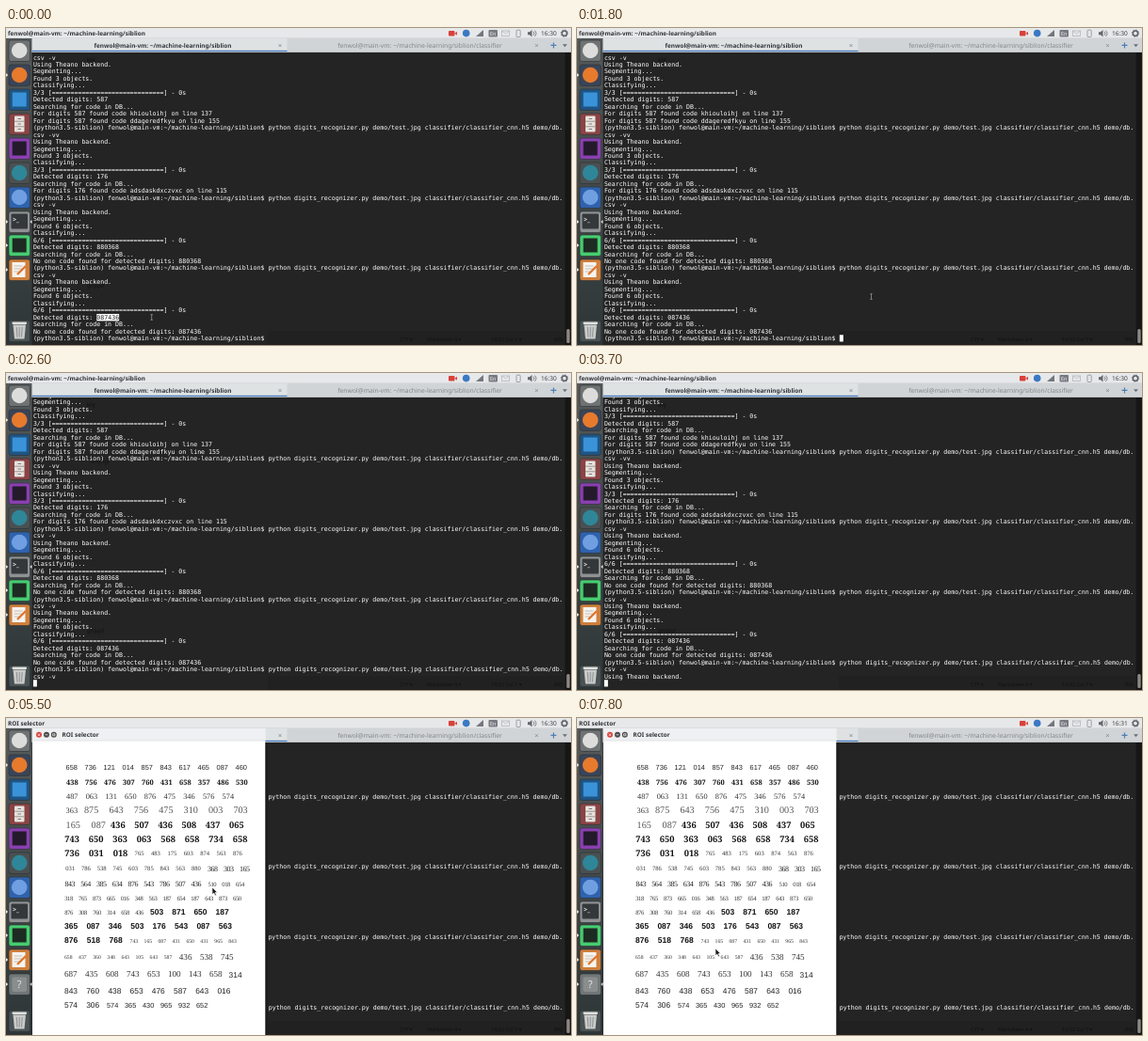
Animation, 600 px wide and 337 px high, one loop 8 s. Source, as an HTML page:

```html
<!DOCTYPE html>
<html lang="en">
<head>
<meta charset="utf-8">
<title>Digits recognizer demo</title>
<style>
  html, body { margin: 0; width: 100%; height: 100%; overflow: hidden; background: #242424; }
  svg { display: block; width: 600px; height: 337px; }
  text { white-space: pre; text-rendering: geometricPrecision; }
  .mono { font: 6.59px "DejaVu Sans Mono", monospace; fill: #fff; }
  .ui { font-family: "Noto Sans", sans-serif; }
</style>
</head>
<body>
<svg id="stage" viewBox="0 0 600 337" width="600" height="337">
  <defs>
    <clipPath id="termClip"><rect x="27" y="26" width="573" height="311"/></clipPath>
    <linearGradient id="dock" x2="0" y2="1">
      <stop offset="0" stop-color="#565a5b"/><stop offset="1" stop-color="#2d3536"/>
    </linearGradient>
    <linearGradient id="shade">
      <stop offset="0" stop-opacity=".45"/><stop offset="1" stop-opacity="0"/>
    </linearGradient>
  </defs>
</svg>
<script>
const LOOP = 8000, STEP = 100;
const CW = 3.967, LH = 7.466, X0 = 28.9, Y0 = 33.5;
const USER = "fenwol@main-vm:", DIR = "~/machine-learning/siblion";
const PROMPT = `(python3.5-siblion) ${USER}${DIR}$ `;
const CMD = "python digits_recognizer.py demo/test.jpg classifier/classifier_cnn.h5 demo/db.";
const SANS = "'Liberation Sans', sans-serif";
const SERIF = "'Liberation Serif', serif";
const WIDE = "'Noto Serif', serif";

const stage = document.getElementById("stage");

function add(parent, tag, attrs, content) {
  const el = document.createElementNS("http://www.w3.org/2000/svg", tag);
  for (const k in attrs) el.setAttribute(k, attrs[k]);
  if (content !== undefined) el.textContent = content;
  parent.appendChild(el);
  return el;
}
const group = (parent, attrs = {}) => add(parent, "g", attrs);
const rect = (p, x, y, width, height, fill, more) => add(p, "rect", { x, y, width, height, fill, ...more });
const circle = (p, cx, cy, r, fill, more) => add(p, "circle", { cx, cy, r, fill, ...more });
const path = (p, d, fill, more) => add(p, "path", { d, fill, ...more });
const label = (p, x, y, size, fill, str, more) =>
  add(p, "text", { x, y, "font-size": size, fill, class: "ui", ...more }, str);
const show = (el, on) => el.setAttribute("visibility", on ? "visible" : "hidden");
const lineY = i => Y0 + i * LH;

// Terminal
function run(objects, digits, found) {
  return ["Using Theano backend.", "Segmenting...", `Found ${objects} objects.`, "Classifying...",
    `${objects}/${objects} [${"=".repeat(30)}] - 0s`, `Detected digits: ${digits}`,
    "Searching for code in DB...",
    ...(found.length ? found.map(([code, n]) => `For digits ${digits} found code ${code} on line ${n}`)
      : [`No one code found for detected digits: ${digits}`])];
}
const log = [
  "csv -v", ...run(3, "587", [["khiouloihj", 137], ["ddageredfkyu", 155]]),
  PROMPT + CMD, "csv -vv", ...run(3, "176", [["adsdaskdxczvxc", 115]]),
  PROMPT + CMD, "csv -v", ...run(6, "880368", []),
  PROMPT + CMD, "csv -v", ...run(6, "087436", []),
  PROMPT
];

rect(stage, 27, 26, 573, 311, "#242424");
rect(stage, 278, 322, 315, 15, "#212121");
const ghosts = group(stage);
[[418, "CTY \u25be"], [447, "Markdown 4 \u25be"], [515, "10:32 Col 7 \u25be"], [582, "INS"]]
  .forEach(([x, s]) => label(ghosts, x, 333, 5.5, "#121212", s));
[[86, 36, "khj"], [90, 96, "dfkjhgf"], [86, 276, "ghjsjsf"]]
  .forEach(([x, y, s]) => label(ghosts, x, y, 6, "#121212", s));

const term = group(stage, { "clip-path": "url(#termClip)" });
const page = group(term);
const addLine = (i, s, x = X0) => add(page, "text", { x, y: lineY(i), class: "mono" }, s);
log.forEach((s, i) => addLine(i, s));
const typed = [addLine(40, CMD, X0 + PROMPT.length * CW), addLine(41, "csv -v")];
const backend = addLine(42, "Using Theano backend.");
const picked = group(page);
rect(picked, X0 + 17 * CW, lineY(37) - 5.8, 6 * CW, LH, "#fff");
add(picked, "text", { x: X0 + 17 * CW, y: lineY(37), class: "mono", style: "fill:#242424" }, "087436");
const caret = rect(page, 0, 0, CW, 7.2, "#fff");

rect(stage, 593.5, 26, 6.5, 311, "#161616");
rect(stage, 595.3, 320, 3.4, 15, "#8d8a86", { rx: 1.5 });

// Tabs
rect(stage, 27, 11, 573, 15, "#d1d4d6");
rect(stage, 27, 11, 271.5, 14.5, "#dfe2e3");
rect(stage, 28, 23.8, 270.5, 1.5, "#4a7fc0");
rect(stage, 27, 25.2, 573, .8, "#b9bdc2");
label(stage, 166.5, 21, 6.4, "#33373c", `${USER} ${DIR}`, { "text-anchor": "middle", "font-weight": 700 });
label(stage, 439.5, 21, 6.76, "#82868b", `${USER} ${DIR}/classifier`, { "text-anchor": "middle" });
[291, 563.5].forEach(x => path(stage, `M${x - 1.4} 17.2l2.8 2.8m0-2.8l-2.8 2.8`, "none",
  { stroke: "#82868b", "stroke-width": .8 }));
path(stage, "M578.5 18.4h6M581.5 15.4v6", "none", { stroke: "#4d7fb5", "stroke-width": 1.2 });
path(stage, "M591 17.2h5l-2.5 3z", "#6b7078");

// Top panel
rect(stage, 0, 0, 600, 11, "#e7e8e9");
rect(stage, 0, 10.5, 600, .6, "#cfd2d5");
const panelTitle = label(stage, 2, 8, 6.4, "#303236", "", { "font-weight": 700 });
rect(stage, 470, 3, 6.5, 5.5, "#d8403a", { rx: 1 });
path(stage, "M476.5 5.7l2.5-2v4z", "#d8403a");
circle(stage, 488.7, 5.6, 3.8, "#3b78c4");
path(stage, "M499 9h8v-7z", "#73777e");
rect(stage, 512.5, 2, 9.5, 7.5, "#777b82", { rx: 1 });
label(stage, 517.2, 7.8, 5.4, "#f3f3f3", "En", { "text-anchor": "middle" });
rect(stage, 526.5, 3, 8, 5.5, "none", { stroke: "#b4b7bb", "stroke-width": .8 });
path(stage, "M526.5 3l4 3 4-3", "none", { stroke: "#b4b7bb", "stroke-width": .7 });
rect(stage, 542, 2.2, 4.2, 7.3, "none", { stroke: "#8b8f95", "stroke-width": .8, rx: .8 });
path(stage, "M554 4.2h2l2.5-2.2v7.5l-2.5-2.2h-2z", "#62666d");
path(stage, "M560 3.8q2 2 0 4M561.4 2.6q3.2 3.2 0 6.4", "none", { stroke: "#62666d", "stroke-width": .8 });
const clock = label(stage, 568, 8.3, 6.6, "#3c3f45", "16:30");
circle(stage, 593, 5.7, 2.6, "none", { stroke: "#5d6168", "stroke-width": 1.5 });
circle(stage, 593, 5.7, 3.7, "none", { stroke: "#5d6168", "stroke-dasharray": "1.2 1.7" });

// Launcher
rect(stage, 0, 11, 27.5, 326, "url(#dock)");
const tile = (p, y, fill) => rect(p, 3, y - 11, 22.5, 22.5, fill, { rx: 2.5, stroke: "#2b3031", "stroke-width": .6 });
const mark = (y, bg, fill, round) => {
  tile(stage, y, bg);
  if (round) circle(stage, 14.2, y, 8.3, fill);
  else rect(stage, 6.7, y - 7.5, 15, 15, fill);
};
mark(24, "#6f7273", "#dcdcdb", true);
mark(50, "#3a4458", "#e77a2c", true);
mark(76, "#1f5483", "#3a93d8");
mark(128, "#8a3fb0", "#241a2c");
mark(154, "#4a5052", "#2f8698", true);
mark(180, "#2f62ad", "#6f9fe0", true);
mark(231, "#46cc70", "#1d2b22");

tile(stage, 102, "#8a4344");
rect(stage, 9, 93.5, 10.5, 17, "#e6e2de", { rx: 1 });
path(stage, "M9 99.2h10.5M9 104.8h10.5", "none", { stroke: "#8b827c", "stroke-width": .8 });
path(stage, "M12.5 96.5h3.5M12.5 102h3.5M12.5 107.5h3.5", "none", { stroke: "#6c635e", "stroke-width": .8 });

tile(stage, 206, "#8f9192");
rect(stage, 5.5, 197.5, 17.5, 16, "#35383a", { rx: 1 });
label(stage, 7, 206, 7, "#e9e9e9", ">_", { "font-weight": 700 });

tile(stage, 257, "#cf7f3c");
rect(stage, 6.5, 249, 14, 16, "#f6f3ee");
path(stage, "M8.5 253h9M8.5 256h9M8.5 259h7", "none", { stroke: "#b6b0aa", "stroke-width": .8 });
path(stage, "M12 262l9-9", "none", { stroke: "#e0742a", "stroke-width": 2.2 });

tile(stage, 322, "#4a5253");
path(stage, "M7.5 315.5h13.5l-1.5 15h-10.5z", "#c9cbca");
path(stage, "M11.3 318l.7 10.5M14.2 318v10.5M17.2 318l-.7 10.5", "none", { stroke: "#858988", "stroke-width": .9 });
rect(stage, 6.5, 312.5, 15.5, 2.6, "#e0e1e0", { rx: 1 });
[50, 206, 231, 257].forEach(y => path(stage, `M0 ${y - 2}l2.2 2-2.2 2z`, "#e8e8e6"));

const focusTerm = path(stage, "M27.5 204l-2.2 2 2.2 2z", "#e8e8e6");
const opening = rect(stage, 9, 273, 10.5, 10.5, "#747a7b", { rx: 1.5, opacity: .7 });
const unknown = group(stage);
tile(unknown, 283, "#717677");
rect(unknown, 6.5, 275.5, 15.5, 15.5, "#898d8e", { rx: 2 });
label(unknown, 14.2, 287.3, 11, "#e4e4e2", "?", { "text-anchor": "middle" });
path(unknown, "M0 281l2.2 2-2.2 2zM27.5 281l-2.2 2 2.2 2z", "#e8e8e6");

// Selector window
const roi = group(stage);
rect(roi, 275, 26, 4, 311, "url(#shade)");
rect(roi, 28, 11, 247.3, 326, "#fff");
rect(roi, 28, 11, 247.3, 13.2, "#eff0f2");
rect(roi, 28, 23.8, 247.3, .6, "#d6d8dc");
circle(roi, 35, 17.8, 3, "#d9453d");
circle(roi, 43, 17.8, 3, "#4c4a4a");
circle(roi, 50.8, 17.8, 3, "#4c4a4a");
path(roi, "M33.8 16.6l2.4 2.4M36.2 16.6l-2.4 2.4M41.6 17.8h2.8M49.6 16.8h2.4v2h-2.4z", "none",
  { stroke: "#fff", "stroke-width": .7 });
label(roi, 59.5, 20.2, 6.4, "#303236", "ROI selector", { "font-weight": 700 });

// Digit styles: family, size, weight, letter spacing, ink
const styles = {
  sans: [SANS, 7.4, 400, 0, "#222"],
  sansBig: [SANS, 8.4, 400, 0, "#222"],
  sansBold: [SANS, 8.5, 700, 0, "#111"],
  bold: [WIDE, 7.5, 700, 0, "#111"],
  boldBig: [WIDE, 9.3, 700, 0, "#111"],
  serif: [SERIF, 8.3, 400, 0, "#333"],
  thin: [SERIF, 10.2, 400, 0, "#555"],
  mid: [SERIF, 9.1, 400, 0, "#333"],
  small: [SERIF, 6.6, 400, 0, "#333"],
  tiny: [SERIF, 5.7, 400, 0, "#333"],
  tall: [SERIF, 8, 400, -.5, "#222"],
  tallSmall: [SERIF, 6.6, 400, -.4, "#333"]
};
function digits(y, style, x, pitch, str) {
  const [family, size, weight, spacing, fill] = styles[style];
  str.split(" ").forEach((s, i) => add(roi, "text", {
    x: x + i * pitch, y, fill, "font-family": family, "font-size": size,
    "font-weight": weight, "letter-spacing": spacing
  }, s));
}
digits(55, "sans", 63.6, 20, "658 736 121 014 857 843 617 465 087 460");
digits(70.8, "bold", 64, 20, "438 756 476 307 760 431 658 357 486 530");
digits(85.8, "serif", 64, 20.7, "487 063 131 650 876 475 346 576 574");
digits(101, "serif", 63.6, 0, "363");
digits(101.4, "thin", 83, 26.4, "875 643 756 475 310 003 703");
digits(117.4, "thin", 63.6, 27, "165 087");
digits(117.4, "boldBig", 111, 25.2, "436 507 436 508 437 065");
digits(132.3, "boldBig", 62.3, 25.5, "743 650 363 063 568 658 734 658");
digits(146.8, "boldBig", 62.3, 25.7, "736 031 018");
digits(146.2, "small", 136.6, 17.4, "765 483 175 603 874 563 876");
digits(162.4, "small", 63.3, 16.7, "031 786 538 745 603 785 843 563 880");
digits(163, "tall", 214, 17, "368 303 165");
digits(179.4, "tall", 62.6, 16.75, "843 564 385 634 876 543 786 507 436");
digits(179, "tallSmall", 214.5, 14.8, "510 018 654");
digits(194, "tallSmall", 62.2, 14.9, "318 765 873 665 016 348 563 187 654 187 643 873 650");
digits(209, "tallSmall", 62.2, 15, "876 308 760 314 658 436");
digits(209.4, "sansBold", 153, 23.2, "503 871 650 187");
digits(224.2, "sansBold", 62, 23.4, "365 087 346 503 176 543 087 563");
digits(239.2, "sansBold", 62, 23.8, "876 518 768");
digits(238.8, "tiny", 131.6, 14.95, "743 165 087 431 650 431 965 843");
digits(255.8, "tiny", 62, 15.1, "658 437 360 348 643 105 643 587");
digits(257, "mid", 183.8, 22.1, "436 538 745");
digits(275.2, "mid", 62, 22, "687 435 608 743 653 100 143 658");
digits(275.6, "sansBig", 236.6, 0, "314");
digits(293.4, "sansBig", 62, 23.2, "843 760 438 653 476 587 643 016");
digits(308.2, "sansBig", 62, 23.2, "574 306");
digits(308, "sans", 107, 19, "574 365 430 965 932 652");

// Pointers
const beam = path(stage, "M-1.2 -2.8h2.4M0 -2.8v5.6M-1.2 2.8h2.4", "none", { stroke: "#bdbdbd", "stroke-width": .6 });
const arrow = path(stage, "M0 0v7.6l1.8-1.6 1.3 2.8 1.3-.6-1.3-2.7h2.4z", "#1c1c1c",
  { stroke: "#fff", "stroke-width": .6 });

// time, x, y
const track = [
  [0, 154.7, 307.5], [500, 252, 314], [700, 262, 314], [1500, 318, 301], [1800, 312.5, 285.5],
  [4300, 312, 284], [4700, 274, 236], [5100, 234, 190], [5300, 231, 164], [5500, 219, 180],
  [6000, 121, 217], [6300, 168, 193], [6600, 126, 262], [6900, 170, 248],
  [7200, 121, 286], [7500, 166, 266], [7800, 147, 245]
];
function pointerAt(t) {
  const i = track.findIndex(k => k[0] > t);
  if (i < 0) return track[track.length - 1].slice(1);
  const [a, b] = [track[i - 1], track[i]];
  const f = (t - a[0]) / (b[0] - a[0]);
  return [a[1] + (b[1] - a[1]) * f, a[2] + (b[2] - a[2]) * f];
}

function draw(t) {
  const scroll = t < 2300 ? 0 : t < 2600 ? 1 : t < 2700 ? 2 : 3;
  page.setAttribute("transform", `translate(0 ${-scroll * LH})`);
  typed.forEach(el => show(el, scroll > 0));
  show(backend, scroll > 2);
  show(picked, t < 300);

  const col = scroll === 0 ? PROMPT.length : scroll === 1 ? 6 : 0;
  caret.setAttribute("x", X0 + col * CW);
  caret.setAttribute("y", lineY(40 + scroll) - 5.9);
  const lit = t < 2300 ? t >= 500 && (t - 500) % 1200 < 600 : t < 3100 || t >= 3700;
  show(caret, lit);

  const open = t >= 3900;
  show(roi, open);
  show(focusTerm, !open);
  show(opening, open && t < 4000);
  show(unknown, t >= 4000);
  panelTitle.textContent = open ? "ROI selector" : `${USER} ${DIR}`;
  clock.textContent = t < 7400 ? "16:30" : "16:31";

  const [x, y] = pointerAt(t);
  const moving = t < 2300 || t >= 4300;
  const overRoi = open && x < 275;
  show(beam, moving && !overRoi);
  show(arrow, moving && overRoi);
  [beam, arrow].forEach(el => el.setAttribute("transform", `translate(${x} ${y})`));
}

const start = performance.now();
function tick() {
  const t = (performance.now() - start) % LOOP;
  draw(Math.floor(t / STEP) * STEP);
  requestAnimationFrame(tick);
}
tick();
</script>
</body>
</html>
```
